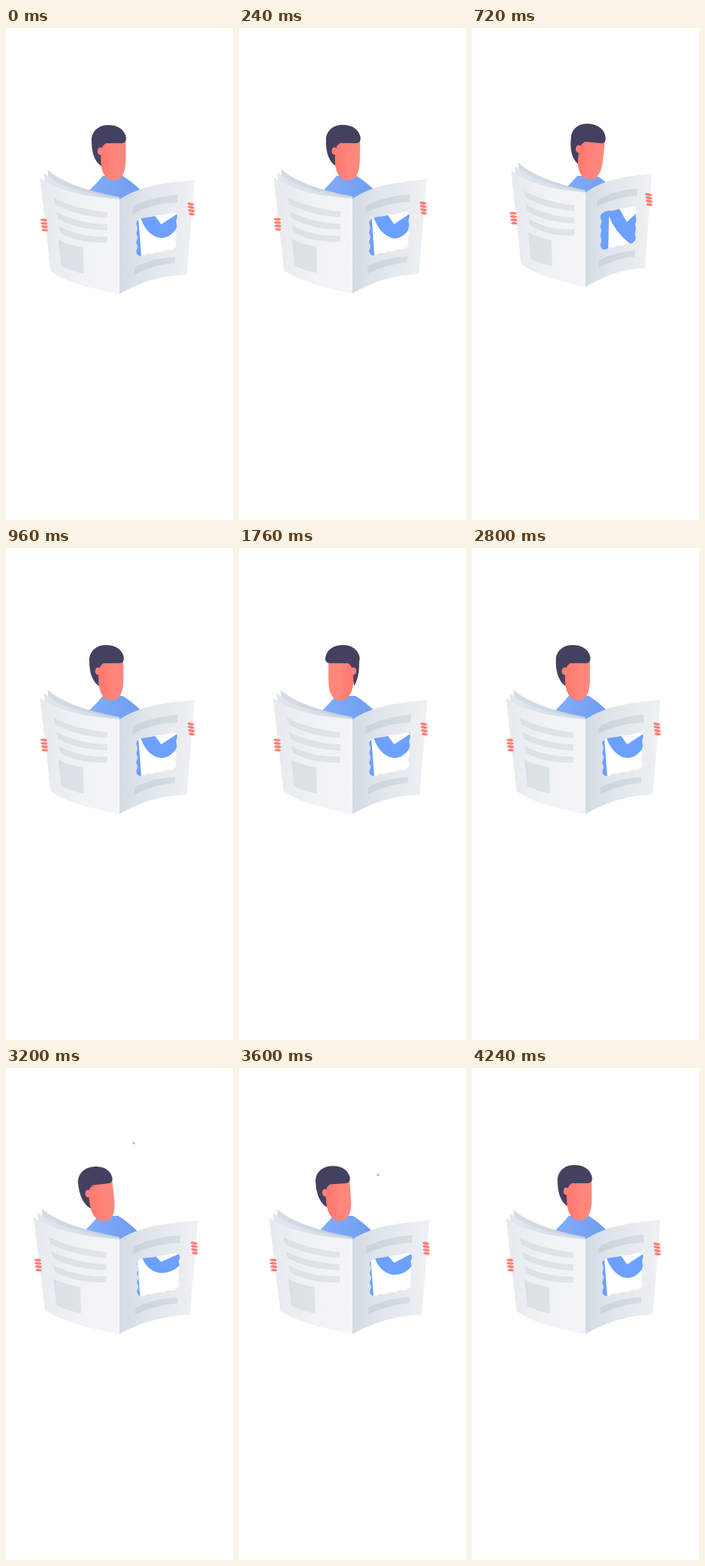
Animation of 300x649 px, one loop 4.32 s. Source, as an HTML page with a canvas:

```html
<!DOCTYPE html>
<html lang="en">
<head>
<meta charset="utf-8">
<title>Newspaper reader</title>
<style>
html, body { margin: 0; width: 100%; height: 100%; overflow: hidden; background: #fff; }
canvas { display: block; width: 300px; height: 649px; }
</style>
</head>
<body>
<canvas id="stage"></canvas>
<script>
const W = 300, H = 649, LOOP = 4320, STEP = 80, SPINE = 150;
const HAIR = '#444060', BLUE = '#6ca1ff', SKIN = '#ff8076';
const canvas = document.getElementById('stage');
const ctx = canvas.getContext('2d');
const dpr = window.devicePixelRatio || 1;
canvas.width = W * dpr;
canvas.height = H * dpr;
ctx.scale(dpr, dpr);

const lerp = (a, b, k) => a + (b - a) * k;

// Eased progress from 0 to 1 between two times.
function ramp(t, from, to) {
  const k = Math.min(1, Math.max(0, (t - from) / (to - from)));
  return k * k * (3 - 2 * k);
}

// narrow: paper folded in, wide: paper pulled open, face: 1 looks right, -1 left.
function pose(t) {
  const narrow = ramp(t, 160, 560) - ramp(t, 720, 960);
  const wide = 2.3 * ramp(t, 2880, 3380) - 1.3 * ramp(t, 3380, 3600) - ramp(t, 3600, 3920);
  const idle = -3 * ramp(t, 720, 960) + 3 * ramp(t, 1200, 1680)
    - 2.3 * ramp(t, 2320, 2800) + 2.3 * ramp(t, 3600, 4240);
  return {
    narrow, wide,
    face: 1 - 2 * (ramp(t, 1200, 1640) - ramp(t, 2320, 2720)),
    headX: 12.2 * narrow - 6 * wide + idle,
    headY: -1.5 * narrow + 0.8 * wide,
    tilt: 6 * narrow - 4 * wide,
    bodyX: 11 * narrow - 3.5 * wide
  };
}

function grad(x0, x1, ...colors) {
  const g = ctx.createLinearGradient(x0, 0, x1, 0);
  colors.forEach((c, i) => g.addColorStop(i / (colors.length - 1), c));
  return g;
}

function shape(d, fill) {
  ctx.fillStyle = fill;
  ctx.fill(new Path2D(d));
}

function oval(x, y, rx, ry, fill, angle = 0) {
  ctx.beginPath();
  ctx.ellipse(x, y, rx, ry, angle, 0, Math.PI * 2);
  ctx.fillStyle = fill;
  ctx.fill();
}

function drawBody(dx) {
  ctx.save();
  ctx.translate(dx, 0);
  shape('M104 220Q118 207 128 195H154Q167 203 180 216L165 235H110Z', grad(107, 176, '#82aefb', '#6f9df0'));
  ctx.restore();
}

function drawHead(s) {
  const f = s.face;
  const x = (mid, d) => mid + f * d;
  ctx.save();
  ctx.translate(140 + s.headX, 200 + s.headY);
  ctx.rotate(s.tilt * Math.PI / 180);
  ctx.translate(-140, -200);

  // back of the hair
  shape(`M${x(136, -22.7)} 145C${x(136, -24)} 166 ${x(137, -18)} 178 ${x(139, -13)} 182
    L${x(139, -9)} 150Z`, HAIR);

  const mid = x(138.2, 3.5), chin = mid + f;
  shape(`M${mid - 16.5} 148H${mid + 16.5}V172C${mid + 16.5} 192 ${chin + 10} 201 ${chin} 201
    C${chin - 10} 201 ${mid - 16.5} 192 ${mid - 16.5} 172Z`,
    grad(x(mid, -16), x(mid, 16), '#ff776c', '#ff8479', '#ff887d'));

  // cap and the temple above the ear
  const c = x(136.4, -0.4);
  shape(`M${c - 17} 152Q${c - 23} 152 ${c - 22.8} 145C${c - 21} 134 ${c - 12} 128 ${c - f} 128
    C${c + 12} 128 ${c + 21} 134 ${c + 22.8} 145Q${c + 23} 152 ${c + 17} 152Z`, HAIR);
  shape(`M${x(136, -22.5)} 145L${x(136, -20)} 165L${x(138, -12)} 161
    Q${x(138, -11)} 154 ${x(138, -4)} 151Z`, HAIR);
  oval(x(138, -13.5), 162.5, 3.6, 5, SKIN);
  ctx.restore();
}

// Placement of a page: scale about the spine, lift and a little shear.
function pageMap(left, s) {
  return {
    sx: 1 + (left ? -0.063 : -0.115) * s.narrow + (left ? 0.05 : 0.028) * s.wide,
    sh: 0.01 * s.narrow + (left ? 0.008 : 0.006) * s.wide,
    dy: -9 * s.narrow
  };
}

function applyMap(m) {
  ctx.transform(m.sx, m.sh, 0, 1, SPINE * (1 - m.sx), m.dy - SPINE * m.sh);
}

function drawLeft(m) {
  ctx.save();
  applyMap(m);
  // two sheets behind the front page
  for (let i = 2; i > 0; i--) {
    const x = 45 + 5 * i, y = 196 - 4.5 * i;
    shape(`M${x} ${y}Q${x + 25} ${y + 23} 150 ${226 - 1.5 * i}V240L${x + 2} ${y + 24}Z`,
      i > 1 ? grad(55, 150, '#d5dce5', '#c5cfdc') : grad(50, 150, '#e1e6ec', '#d2dae4'));
  }
  shape('M45 198Q76 221 150 226V351Q85 339 59 321Z', grad(45, 150, '#e6eaee', '#f0f2f5', '#f4f5f8'));

  const ink = grad(62, 136, '#d9e0e5', '#e0e5e9');
  for (let i = 0; i < 3; i++) {
    const x = 63 + 3 * i, y = 224 + 18.5 * i, end = 243 + 16 * i;
    shape(`M${x} ${y}Q${92 + 2 * i} ${y + 15} 134 ${end}v8Q${92 + 2 * i} ${y + 23.5} ${x + 2.5} ${y + 9}Z`, ink);
  }
  shape('M69 279Q84 287 102 289L103 324Q85 321 73 314Z', ink);
  ctx.restore();
}

// Points along a torn edge, alternating to both sides of the line.
function torn(x0, y0, x1, y1, n, amp) {
  const len = Math.hypot(x1 - x0, y1 - y0);
  return Array.from({ length: n }, (_, i) => {
    const k = i / n, d = (i % 2 ? amp : -amp) / len;
    return [lerp(x0, x1, k) + (y1 - y0) * d, lerp(y0, y1, k) - (x1 - x0) * d];
  });
}

const hole = [
  ...torn(174, 252, 226, 243, 6, 0.6),
  ...torn(226, 243, 224, 291, 8, 1.3),
  ...torn(224, 291, 174, 301, 8, 1.4),
  ...torn(173, 301, 173, 252, 8, 1.8)
];

function traceHole() {
  const half = (p, q) => [(p[0] + q[0]) / 2, (p[1] + q[1]) / 2];
  ctx.beginPath();
  ctx.moveTo(...half(hole[hole.length - 1], hole[0]));
  hole.forEach((p, i) => ctx.quadraticCurveTo(...p, ...half(p, hole[(i + 1) % hole.length])));
  ctx.closePath();
}

// Sleeve and side of the shirt seen through the hole.
function drawSleeve(s) {
  const n = s.narrow, w = s.wide;
  const p = (xa, ya, xb, yb) => `${lerp(xa, xb, n)} ${lerp(ya, yb, n)} `;
  shape('M' + p(168, 238, 165, 230) + 'L' + p(195.5, 246, 193, 235)
    + 'L' + p(205, 259 - 2 * w, 204.5, 256)
    + 'L' + p(233 + 3 * w, 241, 224, 238)
    + 'V' + lerp(250, 262, n)
    + 'Q' + p(222 + 2 * w, 277 - 4 * w, 218, 284) + p(205, 277 - 4 * w, 209, 285)
    + 'Q' + p(187, 275 - 4 * w, 188, 268) + p(178 + w, 251 - w, 181, 248) + 'Z', BLUE);
  shape('M' + p(160, 238, 160, 230) + 'L' + p(173 - w, 240, 181, 234)
    + 'L' + p(175 - w, 252, 181, 249) + 'L' + p(179 - w, 304, 180, 298)
    + 'H160Z', BLUE);
}

function drawRight(m, s) {
  ctx.save();
  applyMap(m);
  shape('M150 226C175 210 200 205 249 200L239 325C205 327 180 334 150 351Z',
    grad(150, 248, '#d2dae3', '#dfe5eb', '#e7ebef', '#eef1f3'));
  const ink = grad(167, 227, '#cad4dc', '#d5dde2');
  shape('M168 236C185 226 205 222 227 220V230C205 231 185 236 167 245Z', ink);
  shape('M170 316Q190 304 224 302L223 310Q195 312 170 325Z', ink);
  traceHole();
  ctx.restore();

  ctx.save();
  ctx.clip();
  ctx.fillStyle = '#fff';
  ctx.fillRect(0, 0, W, H);
  drawSleeve(s);
  ctx.restore();
}

function drawFingers(m, x, y, lean) {
  const px = SPINE + (x - SPINE) * m.sx;
  for (let i = 0; i < 4; i++) {
    oval(px + i * 0.4, y + m.dy + i * 4.4, i < 3 ? 4.6 : 4.1, 1.8, SKIN, lean);
  }
}

// A speck shaken out of the paper, rising and falling on a parabola.
function drawSpeck(t) {
  const u = (t - 2960) / 800;
  if (u <= 0 || u >= 1) return;
  ctx.globalAlpha = Math.min(1, 5 * u, 5 * (1 - u));
  oval(160 + 29.6 * u, 99 + 168 * (u - 0.3) ** 2, 1.8, 1.8, '#b9bdc6');
  ctx.globalAlpha = 1;
}

function draw(t) {
  const s = pose(t);
  ctx.fillStyle = '#fff';
  ctx.fillRect(0, 0, W, H);
  drawBody(s.bodyX);
  drawHead(s);
  drawSpeck(t);
  const left = pageMap(true, s), right = pageMap(false, s);
  drawLeft(left);
  drawRight(right, s);
  drawFingers(left, 50 - 2 * s.narrow, 253.3, 0.06);
  drawFingers(right, 244.2, 232.2 - 3.5 * s.narrow - 0.8 * s.wide, 0.16);
}

function tick(now) {
  draw(Math.floor((now % LOOP) / STEP) * STEP);
  requestAnimationFrame(tick);
}
draw(0);
requestAnimationFrame(tick);
</script>
</body>
</html>
```
